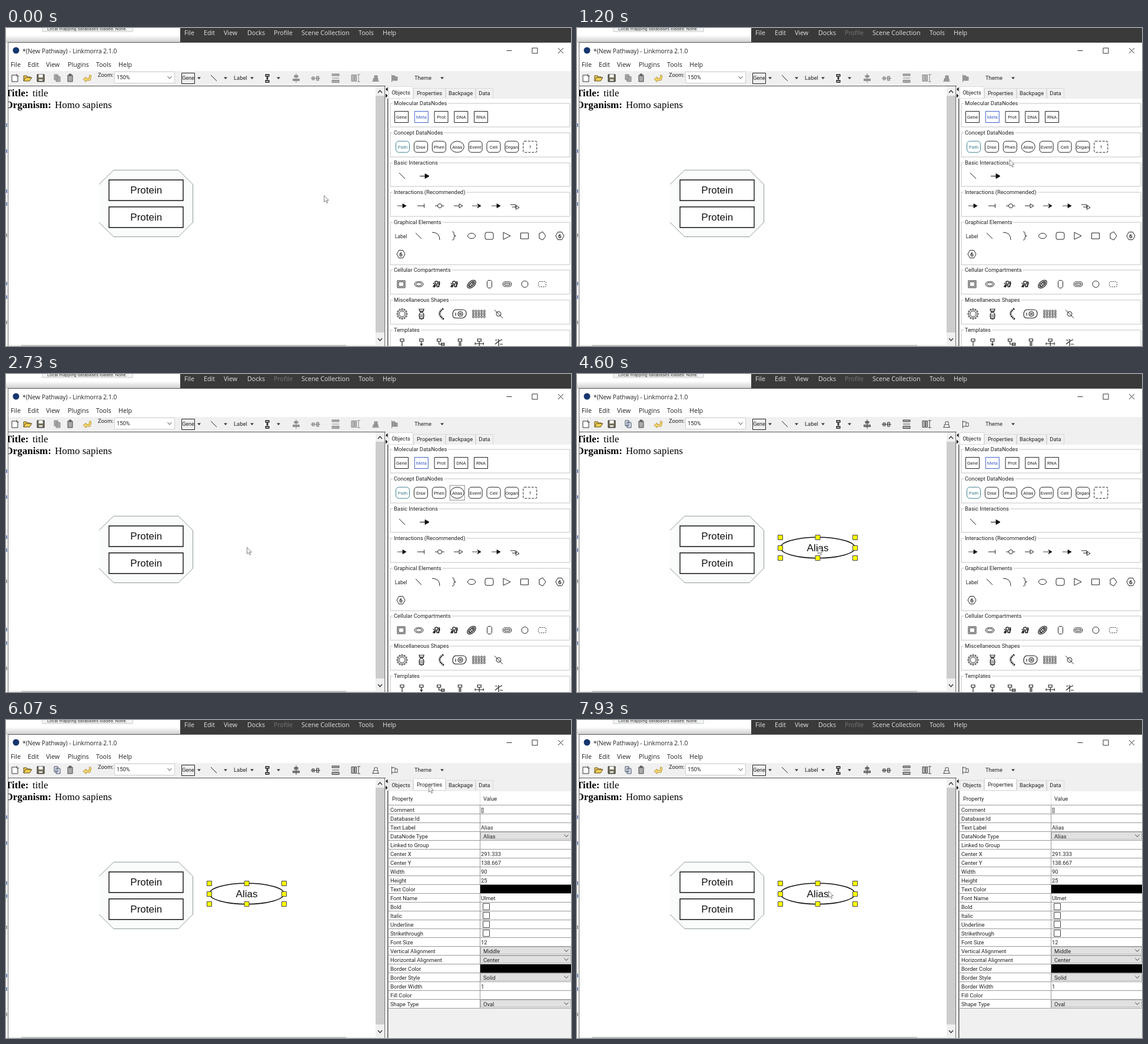
An HTML page with a canvas that plays this animation: 960x540 px, repeating every 8000 ms.

```html
<!DOCTYPE html>
<html lang="en">
<head>
<meta charset="utf-8">
<title>Pathway editor</title>
<style>
html, body { margin: 0; width: 100%; height: 100%; overflow: hidden; background: #fff; }
canvas { display: block; width: 960px; height: 540px; }
</style>
</head>
<body>
<canvas id="stage" width="960" height="540"></canvas>
<script>
const ctx = document.getElementById('stage').getContext('2d');
const LOOP = 8000, SELECTED = 1560, PLACED = 2930, PROPERTIES = 5770;
const UI = 'Roboto, sans-serif', SYSTEM = '"Open Sans", sans-serif';
const SANS = '"Liberation Sans", sans-serif', SERIF = '"Liberation Serif", serif';
const INK = '#222', FACE = '#f0f0f0';

// Pointer stops: time, x, y
const POINTER = [
  [0, 540, 285], [70, 540, 285], [400, 592, 270], [730, 632, 251], [870, 657, 248],
  [1000, 680, 245], [1250, 748, 219], [1400, 768, 207], [1640, 768, 206], [1730, 756, 209],
  [1800, 733, 211], [2000, 686, 197], [2330, 635, 177], [2530, 632, 174], [2600, 632, 174],
  [2670, 490, 255], [2730, 409, 295], [4780, 409, 295], [5000, 520, 235], [5250, 690, 130],
  [5450, 737, 103], [5670, 720, 111], [5770, 718, 112], [7130, 718, 112], [7330, 668, 138],
  [7600, 550, 220], [7800, 450, 281], [7930, 427, 291], [8000, 427, 291]
];

function pointerAt(t) {
  const i = Math.max(1, POINTER.findIndex(p => p[0] >= t));
  const [a, b] = [POINTER[i - 1], POINTER[i]];
  const k = (t - a[0]) / (b[0] - a[0]);
  return [a[1] + (b[1] - a[1]) * k, a[2] + (b[2] - a[2]) * k];
}

function box(x, y, w, h, fill, stroke, width = 1, radius = 0) {
  ctx.beginPath();
  ctx.roundRect(x, y, w, h, radius);
  if (fill) { ctx.fillStyle = fill; ctx.fill(); }
  if (stroke) { ctx.strokeStyle = stroke; ctx.lineWidth = width; ctx.stroke(); }
}

function text(s, x, y, size = 9.4, family = UI, color = INK, align = 'left', weight = '') {
  ctx.font = `${weight} ${size}px ${family}`;
  ctx.fillStyle = color;
  ctx.textAlign = align;
  ctx.fillText(s, x, y);
}

function icon(x, y, d, stroke = INK, fill, width = 1) {
  const path = new Path2D(d);
  ctx.save();
  ctx.translate(x, y);
  if (fill) { ctx.fillStyle = fill; ctx.fill(path); }
  if (stroke) { ctx.strokeStyle = stroke; ctx.lineWidth = width; ctx.stroke(path); }
  ctx.restore();
}

function dashed(pattern, draw) {
  ctx.setLineDash(pattern);
  draw();
  ctx.setLineDash([]);
}

const oval = (rx, ry = rx, x = 0, y = 0) =>
  `M${x - rx} ${y}a${rx} ${ry} 0 1 0 ${2 * rx} 0a${rx} ${ry} 0 1 0 ${-2 * rx} 0z`;
const rect = (w, h, x = 0, y = 0) => `M${x - w / 2} ${y - h / 2}h${w}v${h}h${-w}z`;
const chevron = (x, y) => icon(x, y, 'M-3.5 -2L0 2L3.5 -2', '#444');
const dropArrow = x => icon(x, 85, 'M-3 -1.5h6l-3 3.5z', null, '#333');

function topBar(t) {
  const shadow = ctx.createLinearGradient(0, 12, 0, 25);
  shadow.addColorStop(0, '#fff');
  shadow.addColorStop(1, '#ccc');
  box(0, 12, 296, 13, shadow);
  box(62, -6, 153, 12, '#f3f4f5', '#c2c5c8');
  text('Local mapping databases loaded: None.', 70, 4, 7.6, UI, '#333');
  box(296, 0, 664, 25, '#3a3a3a');
  for (const [s, x] of [['File', 303], ['Edit', 336], ['View', 370], ['Docks', 410], ['Profile', 455],
                        ['Scene Collection', 502], ['Tools', 599], ['Help', 640]])
    text(s, x, 12, 10.7, SYSTEM, s === 'Profile' && t > 300 ? '#777' : '#e4e4e4');
}

function windowFrame() {
  box(3, 24, 957, 516, '#fff');
  box(3, 24, 957, 1, '#555');
  box(3, 24, 1, 516, '#666');
  for (const y of [165, 209, 277, 299, 352, 434, 457, 500]) box(0, y - 3, 2, 6, y % 4 ? '#6d88b5' : '#999');
  icon(17, 38, oval(5.5), null, '#16356f');
  text('*(New Pathway) - Linkmorra 2.1.0', 28, 42.5, 10.3, SYSTEM);
  icon(855, 38, 'M-4.5 .5h9', '#333');
  icon(898, 38, rect(9, 9, .5, .5), '#333');
  icon(942, 38, 'M-4 -4l9 9M5 -4l-9 9', '#333');
  for (const [s, x] of [['File', 8], ['Edit', 37], ['View', 68], ['Plugins', 105], ['Tools', 153], ['Help', 191]])
    text(s, x, 65.7, 10.7, SYSTEM);
}

function toolbar(active) {
  box(4, 73, 956, 26, FACE);
  const dim = active ? '#444' : '#888', light = active ? '#fff' : '#999';
  icon(15, 85, 'M-5 -5h7l3 3v8h-10zM3 -7l1 3 3 1', '#333', '#fff');
  icon(37, 85, 'M-7 5v-9h5l1 2h5v2M-7 5l3 -6h11l-4 6z', '#5c4a18', '#f0cf55');
  icon(59, 85, rect(12, 12), '#222', '#77735a');
  box(55.5, 79, 7, 5, '#fff');
  box(56, 87, 6, 3, '#ddd');
  icon(87, 85, 'M-5 -6h6v9h-6zM-2 -3h6l1 1v8h-7z', active ? '#3e4a63' : '#888', active ? '#dfe5ef' : '#aaa');
  icon(109, 85, 'M-4 -5h8v11h-8zM-1.5 -7h3v3h-3z', '#444', '#a9a9a9');
  icon(138, 85, 'M-7 2l5 -4v2.5h5l1 -6 3 2 -2 7.5h-7v2.5z', '#a88432', '#f5d86c', .8);
  text('Zoom:', 156, 83);
  box(184.5, 74.5, 102, 19, '#fff', '#d0d0d0');
  text('150%', 188, 87);
  chevron(278, 84);
  box(298.5, 76.5, 22, 18, FACE, '#222');
  text('Gene', 309.5, 88, 9, UI, INK, 'center');
  icon(353, 85, 'M-5 -5l10 10');
  text('Label', 387, 88);
  icon(444, 85, rect(10, 16), '#fff', '#fff');
  icon(444, 85, 'M-3 -6h6v3h-6zM-3 4h6v3h-6zM0 -3v7M-2 0h4', '#111', null, 1.3);
  [328, 373, 418, 463, 741].forEach(dropArrow);
  icon(493, 85, 'M0 -8v16' + rect(6, 3, 0, -3) + rect(11, 3, 0, 3), dim, '#999');
  icon(526, 85, 'M-8 .5h16' + rect(4, 5, -4, .5) + rect(4, 7, 3.5, .5), dim, '#bbb');
  icon(560, 85, rect(12, 3, 0, -5.5) + rect(12, 4, 0, 5.5) + 'M-6 0h12', dim, '#aaa');
  icon(594, 85, rect(4, 11, -5, 0) + rect(3, 11) + 'M5 -6v12M3 -6h5M3 6h5', dim, '#bbb');
  icon(628, 85, 'M-6 5.5h12M-4 5v-4h8v4M-2 1v-5h5v5', dim, light);
  icon(660, 85, 'M-4.5 -6v13M-4 -4h5v8h-5M1 -2h4v6h-4', dim, light);
  text('Theme', 694, 88);
}

function drawing(placed) {
  box(4, 98, 641, 1, '#555');
  ctx.save();
  ctx.beginPath();
  ctx.rect(4, 99, 624, 441);
  ctx.clip();
  text('Title:', -1, 116, 17, SERIF, '#000', 'left', 'bold');
  text('title', 45, 116, 17, SERIF, '#000');
  text('Organism:', -1.5, 136, 17, SERIF, '#000', 'left', 'bold');
  text('Homo sapiens', 83, 136, 17, SERIF, '#000');
  icon(158, 241, 'M0 24.5L25 .3H135L159.5 24.5V89L135 113.5H25L0 89', '#8d9b96', '#fafcfb');
  for (const y of [258, 303.8]) {
    box(175, y, 126, 35, '#fff', '#111', 1.4);
    text('Protein', 238.3, y + 23, 17, SANS, '#111', 'center');
  }
  if (placed) {
    icon(409, 295, oval(63.5, 17.7), '#111', '#fff', 1.4);
    text('Alias', 409, 301, 17, SANS, '#111', 'center');
    for (const x of [345.5, 409, 472.5])
      for (const y of [277.5, 295.5, 312.5])
        if (x !== 409 || y !== 295.5) box(x - 4, y - 4, 8, 8, '#ff0', '#444');
  }
  ctx.restore();
  box(628, 99, 15, 441, FACE);
  box(628, 115, 15, 402, '#cdcdcd');
  icon(635.5, 108, 'M-3.5 2L0 -2L3.5 2', '#333', null, 1.4);
  icon(635.5, 529, 'M-3.5 -2L0 2L3.5 -2', '#333', null, 1.4);
  box(4, 538, 624, 2, FACE);
  box(26, 538, 552, 2, '#c4c4c4');
  box(643, 99, 7, 441, FACE);
  box(643, 99, 1, 441, '#777');
  box(648, 120, 1.5, 420, '#555');
  icon(647, 104, 'M1.5 -3.5v7l-3.5 -3.5z', null, '#111');
  icon(646, 115, 'M-1 -3.5v7l3.5 -3.5z', null, '#111');
}

function tabs(selected) {
  box(650, 99, 310, 21, FACE);
  [['Objects', 650, 41], ['Properties', 692, 54], ['Backpage', 747, 50], ['Data', 798, 29]].forEach(([s, x, w], i) => {
    const on = i === selected;
    box(x + .5, on ? 99.5 : 102.5, w, 20, on ? '#fff' : FACE, '#d9d9d9');
    text(s, x + w / 2 + .5, on ? 113 : 114, 9.4, UI, INK, 'center');
  });
}

function group(title, y, bottom) {
  box(653, y, 305, bottom - y, null, '#c3c3c3');
  ctx.font = `9.4px ${UI}`;
  box(657, y - 2, ctx.measureText(title).width + 4, 5, '#fff');
  text(title, 659, y + 3.2);
}

function nodeButton(label, x, y, round, color = INK) {
  if (label === 'Alias') icon(x, y, oval(11.5, 9.5), color, '#fff');
  else if (label === '?') dashed([4, 2], () => box(x - 11.5, y - 9.5, 23, 19, '#fff', color, 1, 2));
  else box(x - 11.5, y - 9.5, 23, 19, '#fff', color, 1, round);
  text(label, x, y + 3, 8, UI, color, 'center');
}

function ring(n, r, size) {
  let d = '';
  for (let i = 0; i < n; i++) {
    const a = i / n * 2 * Math.PI;
    d += oval(size, size, r * Math.cos(a), r * Math.sin(a));
  }
  return d;
}

function objects(t, [px, py]) {
  box(650, 120, 310, 420, '#fff');
  [['Molecular DataNodes', 128, 168], ['Concept DataNodes', 178, 219], ['Basic Interactions', 229, 269],
   ['Interactions (Recommended)', 279, 320], ['Graphical Elements', 330, 402], ['Cellular Compartments', 411, 452],
   ['Miscellaneous Shapes', 462, 503], ['Templates', 513, 560]].forEach(g => group(...g));

  ['Gene', 'Meta', 'Prot', 'DNA', 'RNA'].forEach((s, i) =>
    nodeButton(s, 672 + i * 33.75, 151, 0, s === 'Meta' ? '#3f5fc8' : INK));
  ['Path', 'Dise', 'Phen', 'Alias', 'Event', 'Cell', 'Organ', '?'].forEach((s, i) => {
    const x = 674 + i * 30.9, y = 201.7;
    if (Math.abs(px - x) < 14 && Math.abs(py - y) < 15) box(x - 14, y - 14.5, 28, 29, '#d9eafa', '#9cc6ea');
    if (s === 'Alias' && t > SELECTED && t < PLACED)
      dashed([1, 1], () => box(x - 12.5, y - 12.5, 25, 25, null, '#111'));
    nodeButton(s, x, y, 5, s === 'Path' ? '#3c8190' : INK);
  });

  const line = 'M-5 -5l10 10', head = 'M1 -3.5l6 3.5 -6 3.5z';
  icon(673, 251, line);
  icon(711, 251.5, 'M-8 0h10M1 -4l7 4 -7 4z', '#111', '#111');
  for (const x of [673, 833]) icon(x, 302, 'M-8 0h10' + head, '#111', '#111', .8);
  icon(800, 302, 'M-8 0h10M1 -3.5l6 3.5 -6 3.5 2 -3.5z', '#111', '#111', .8);
  icon(706, 302, 'M-7 0h11M4.5 -3.5v7');
  icon(737, 302, 'M-8 0h4.5M3.5 0h4' + oval(3.5));
  icon(769, 302, 'M-8 0h9' + head);
  icon(865, 302, 'M-8 -2h9v5M-5 2h8M2 -1l5 4 -6 3z');

  [line, 'M-7 -6q13 0 13 13', 'M-3 -7q4 0 3 4q0 3 3 3q-3 0 -3 3q1 4 -3 4', oval(6.5, 4.5),
   'M-4 -6h8q3 0 3 3v6q0 3 -3 3h-8q-3 0 -3 -3v-6q0 -3 3 -3z', 'M-6 -6l12 6 -12 6z', rect(13, 10),
   'M-5 -4l6 -3 5 7 -5 7 -6 -3z'].forEach((d, i) => icon(701 + i * 30, 353, d));
  text('Label', 671, 357, 8.5, UI, INK, 'center');
  for (const [x, y] of [[941, 353], [671, 384]]) {
    icon(x, y, 'M-7 0l3.5 -6.5h7l3.5 6.5 -3.5 6.5h-7z');
    text('6', x, y + 3.5, 9.5, UI, INK, 'center', 'bold');
  }

  const folds = 'M-6 5q4 -7 2 -2q0 5 3 -3q-4 -5 1 -5q4 0 1 5q-2 6 2 4q4 -5 1 -9M-6 -2l3 2M4 5v-8';
  const pill = (w, h) => `M${-w / 2 + 2} ${-h / 2}h${w - 4}l2 2v${h - 4}l-2 2h${4 - w}l-2 -2v${4 - h}z`;
  [rect(13, 12) + rect(9, 8), oval(7.5, 4.5) + oval(5, 2.5), folds, folds, '',
   pill(8, 13), pill(14, 8) + rect(9, 3), oval(5.5)]
    .forEach((d, i) => icon(671.5 + i * 30, 435, d, INK, null, d === folds ? 1.5 : 1));
  ctx.save();
  ctx.translate(791, 435);
  ctx.rotate(-.7);
  icon(0, 0, oval(8.5, 5) + oval(6, 2.5) + 'M-4 -2v4M-1 -3v5M2 -2v4M4 -2v3', INK, null, 1.3);
  ctx.restore();
  dashed([2, 1.5], () => box(904.5, 430.5, 13, 9, null, '#333', 1, 2));

  icon(673, 485.5, ring(12, 8, 1.2) + oval(5));
  icon(706, 485.5, 'M-4 -9q0 5 4 6t4 6 -4 6M4 -9q0 5 -4 6t-4 6 4 6M-4 -8h8M-4 -5h8M-4 2h8M-4 5h8M-4 8h8', INK, null, 1.2);
  dashed([2, 1], () => icon(739, 485.5, 'M4 -9q-13 9 1 18', INK, null, 3));
  icon(771, 485.5, 'M-8 -7h13q6 0 6 6t-6 8h-12q-5 0 -5 -6t4 -8z' + oval(4, 4, 1, 0) + oval(1.5, 1.5, 1, 0) + 'M-7 -2v5', INK, null, 1.2);
  for (let i = 0; i < 5; i++)
    icon(794 + i * 4.7, 485.5, oval(1.5, 1.5, 0, -5) + oval(1.5, 1.5, 0, 5) + 'M-1 -3v6M1 -3v6');
  icon(837, 485.5, oval(4) + 'M-7 -7l14 14');

  const stem = 'M-3 -6h6v4h-6zM0 -2v9';
  [stem, stem + 'M-2 2l2 3 2 -3', 'M-6 -6h6v4h-6zM-3 -2v5h9M1 1h5v4h-5z', stem + 'M-3 4h6M-3 1h6',
   stem + 'M-7 2h14M-7 0v4M7 0v4', 'M-6 3l6 -5 6 -3M0 -6v12M-6 -4h4M2 3h5']
    .forEach((d, i) => icon(673 + i * 32.8, 534, d, INK, null, 1.2));
}

// Kinds: '=' list, '#' colour, '?' checkbox
const ROWS = ['Comment|[]', 'Database:Id|', 'Text Label|Alias', 'DataNode Type|=Alias', 'Linked to Group|',
  'Center X|291.333', 'Center Y|138.667', 'Width|90', 'Height|25', 'Text Color|#', 'Font Name|Ulmet',
  'Bold|?', 'Italic|?', 'Underline|?', 'Strikethrough|?', 'Font Size|12', 'Vertical Alignment|=Middle',
  'Horizontal Alignment|=Center', 'Border Color|#', 'Border Style|=Solid', 'Border Width|1', 'Fill Color|',
  'Shape Type|=Oval'];

function properties() {
  box(650, 120, 310, 420, FACE);
  box(650, 121, 310, 369, '#fff');
  text('Property', 656, 137);
  text('Value', 811, 137);
  ROWS.forEach((row, i) => {
    const [name, value] = row.split('|'), y = 144 + i * 15, kind = value[0];
    text(name, 653, y + 11.5);
    if (kind === '#') box(806, y, 154, 15, '#000');
    else if (kind === '?') box(810.5, y + 2.5, 11, 11, '#fff', '#444');
    else if (kind === '=') {
      box(806.5, y + 1.5, 153, 12, '#e1e1e1', '#b5b5b5');
      text(value.slice(1), 811, y + 11.5);
      chevron(952, y + 7.5);
    } else text(value, 807, y + 11.5);
    box(650, y, 310, 1, '#999');
  });
  box(650, 489, 310, 1, '#999');
  box(805, 122, 1, 22, '#ddd');
  box(805, 144, 1, 346, '#999');
}

function render(t) {
  const pointer = pointerAt(t), placed = t >= PLACED, showProperties = t >= PROPERTIES;
  box(0, 0, 960, 540, '#fff');
  topBar(t);
  windowFrame();
  toolbar(placed);
  drawing(placed);
  tabs(showProperties ? 1 : 0);
  if (showProperties) properties();
  else objects(t, pointer);
  icon(...pointer, 'M.5 -.5V10.5L3 8.2L4.9 12.2L6.7 11.4L4.9 7.5H8.3z', '#808080', '#fff');
}

function tick() {
  render(performance.now() % LOOP);
  requestAnimationFrame(tick);
}
tick();
</script>
</body>
</html>
```
